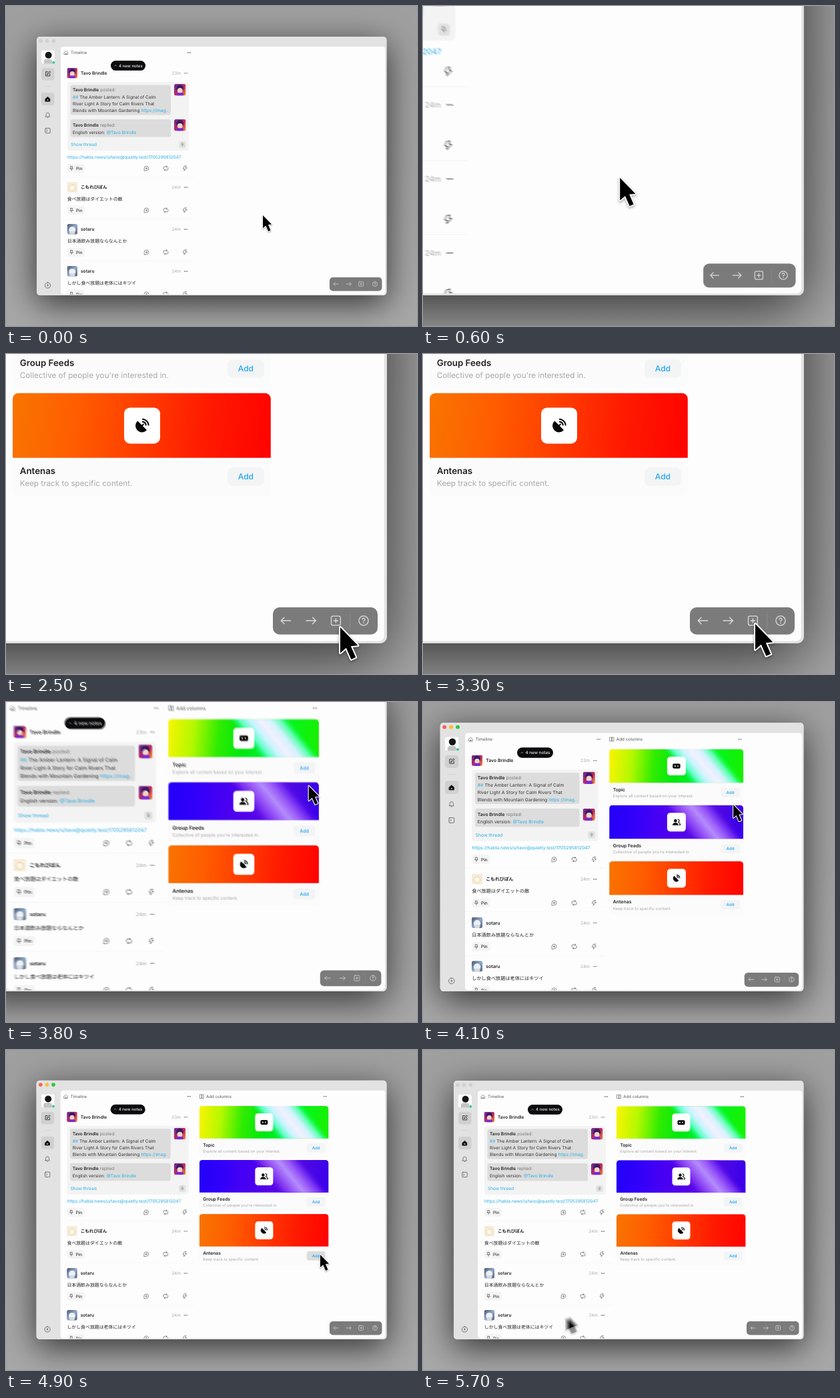
Recreate the animation shown at these times as an HTML page with a canvas. Size 616 by 480 pixels, loop 5800 ms.

```html
<!DOCTYPE html>
<html lang="en">
<head>
<meta charset="utf-8">
<title>Adding a column</title>
<style>
html, body { margin: 0; width: 100%; height: 100%; overflow: hidden; background: #9e9e9e; }
canvas { display: block; width: 616px; height: 480px; }
</style>
</head>
<body>
<canvas id="stage" width="616" height="480"></canvas>
<script>
const W = 616, H = 480, LOOP = 5800;
const ANCHOR = { x: 570, y: 434 };      // the zoom keeps this window corner fixed
const COLUMN_AT = 2300, FOCUS_ON = 1700, FOCUS_OFF = 5500;
const SHUTTER = 12, SAMPLES = 5;
const LINK = '#2aaee6', GREY = '#a9a9a9', INK = '#222';

const out = document.getElementById('stage').getContext('2d');
const layer = document.createElement('canvas');
layer.width = W;
layer.height = H;
const c = layer.getContext('2d');

const ICONS = {
  home: 'M4 11 12 4l8 7v9H4zM10 20v-5h4v5',
  edit: 'M12 4H5v15h15v-7M10 14l1-4 8-8 3 3-8 8z',
  bell: 'M6 16v-6a6 6 0 0 1 12 0v6l2 2H4zM10 21h4',
  term: 'M6 4h12a2 2 0 0 1 2 2v12a2 2 0 0 1-2 2H6a2 2 0 0 1-2-2V6a2 2 0 0 1 2-2zM8 9l3 3-3 3',
  round: 'M12 3a9 9 0 1 1 0 18 9 9 0 0 1 0-18zM12 10a2 2 0 1 1 0 4 2 2 0 0 1 0-4z',
  pin: 'M8 3h8v6l3 5H5l3-5zM12 14v7',
  reply: 'M3 21v-9a9 9 0 1 1 9 9zM12 8v8M8 12h8',
  repost: 'M4 14V9a3 3 0 0 1 3-3h10M14 3l3 3-3 3M20 10v5a3 3 0 0 1-3 3H7M10 21l-3-3 3-3',
  zap: 'M16 2 8 4 4 14h6l-2 8 12-12h-6z',
  left: 'M21 12H3M9 6l-6 6 6 6',
  right: 'M3 12h18M15 6l6 6-6 6',
  plus: 'M6 3h12a3 3 0 0 1 3 3v12a3 3 0 0 1-3 3H6a3 3 0 0 1-3-3V6a3 3 0 0 1 3-3zM12 8v8M8 12h8',
  help: 'M12 3a9 9 0 1 1 0 18 9 9 0 0 1 0-18zM9.5 9.5a2.5 2.5 0 1 1 3.7 2.2c-1 .6-1.2 1-1.2 2M12 16.5v.5',
  cols: 'M3 3h8v18H3zM14 3h7v18h-7z',
  up: 'M6 15l6-6 6 6',
  people: 'M9 4a4 4 0 1 1 0 8 4 4 0 0 1 0-8zM1 20c0-8 16-8 16 0z',
  peopleBack: 'M16 4a4 4 0 0 1 0 8M19 14c3 1 4 3 4 6h-3',
  dish: 'M5 6 18 19A9.2 9.2 0 0 1 5 6zM11 13l3-3',
  waves: 'M13 6a6 6 0 0 1 5 5M13 2a10 10 0 0 1 9 9',
  arrow: 'M0 0V19.2L4.4 15.4 8.2 24 11.6 22.5 7.9 14.1 13.2 13.6z'
};
for (const k in ICONS) ICONS[k] = new Path2D(ICONS[k]);

const clamp = v => Math.max(0, Math.min(1, v));
const smooth = u => { u = clamp(u); return u * u * (3 - 2 * u); };
// overdamped spring from 0 to 1, with a slow and a fast decay rate per second
function spring(t, t0, slow = 4.9, fast = 9.9) {
  const s = Math.max(0, t - t0) / 1000;
  return 1 - (fast * Math.exp(-slow * s) - slow * Math.exp(-fast * s)) / (fast - slow);
}
const zoom = t => 1 + spring(t, 200, 6.2, 8) - spring(t, 3300);

// start, end, x, y of each pointer move
const MOVES = [
  [200, 1550, 525.5, 410.5],
  [1700, 2150, 535.5, 422],
  [2500, 2900, 534, 419.5],
  [3330, 3840, 469, 164.5],
  [4250, 4800, 471, 307],
  [5250, 5950, 108, 441]
];
function pointer(t) {
  let x = 385, y = 314;
  for (const [a, b, tx, ty] of MOVES) {
    const k = smooth((t - a) / (b - a));
    x += (tx - x) * k;
    y += (ty - y) * k;
  }
  return { x, y };
}

function box(x, y, w, h, r, fill) {
  c.beginPath();
  c.roundRect(x, y, w, h, r);
  c.fillStyle = fill;
  c.fill();
}
function disc(x, y, r, fill) {
  c.beginPath();
  c.arc(x, y, r, 0, 7);
  c.fillStyle = fill;
  c.fill();
}
function icon(name, x, y, size, color, width = 1.7, fill = false) {
  c.save();
  c.translate(x - size / 2, y - size / 2);
  c.scale(size / 24, size / 24);
  c.lineWidth = width;
  c.lineCap = c.lineJoin = 'round';
  c.strokeStyle = c.fillStyle = color;
  if (fill) c.fill(ICONS[name]);
  c.stroke(ICONS[name]);
  c.restore();
}
function text(s, x, y, size, color, weight = 400, align = 'left') {
  c.font = `${weight} ${size}px Inter, "Noto Sans CJK JP", "Noto Sans CJK", sans-serif`;
  c.textAlign = align;
  c.fillStyle = color;
  c.fillText(s, x, y);
  return x + c.measureText(s).width;
}
function dots(x, y) {
  for (const d of [-2, 0, 2]) disc(x + d, y, 0.65, '#444');
}
function ramp(x0, y0, x1, y1, ...stops) {
  const g = c.createLinearGradient(x0, y0, x1, y1);
  stops.forEach((s, i) => g.addColorStop(i / (stops.length - 1), s));
  return g;
}
function clipped(x, y, w, h, r, draw) {
  c.save();
  c.beginPath();
  c.roundRect(x, y, w, h, r);
  c.clip();
  draw();
  c.restore();
}
const within = (p, x, y, w, h) => p.x >= x && p.x <= x + w && p.y >= y && p.y <= y + h;

function avatar(kind, x, y, s) {
  clipped(x, y, s, s, 3, () => {
    c.translate(x, y);
    c.scale(s / 16, s / 16);
    if (kind === 'vivid') {
      c.fillStyle = ramp(0, 0, 16, 16, '#5a2d9c', '#c02860', '#f08a28');
      c.fillRect(0, 0, 16, 16);
      disc(8, 6, 5, '#3b1a63');
      disc(8, 9, 3.6, '#f6d3c4');
      box(3, 12, 10, 4, 2, '#7a2bd0');
    } else if (kind === 'cream') {
      c.fillStyle = '#f6ecd8';
      c.fillRect(0, 0, 16, 16);
      disc(8, 9, 5, '#fdf8ea');
      c.strokeStyle = '#e2bf88';
      c.lineWidth = 0.8;
      c.beginPath();
      c.arc(8, 9, 4.5, 0, 7);
      c.stroke();
    } else if (kind === 'pale') {
      c.fillStyle = ramp(0, 0, 16, 16, '#4b5566', '#8fa9cc', '#5b6274');
      c.fillRect(0, 0, 16, 16);
      disc(8, 9, 5, '#eef1f6');
      box(4, 11, 8, 5, 2, '#d5dae4');
    } else {
      c.fillStyle = '#fafafa';
      c.fillRect(0, 0, 16, 16);
      box(3, 10.5, 10, 7, 3, '#c4c4c4');
      disc(8.5, 5.8, 4, '#151515');
    }
  });
}

function sidebar() {
  avatar('person', 53, 66.5, 20);
  disc(71.3, 84.8, 2, '#2fd08a');
  box(53, 93, 19.5, 18.5, 4, '#d0d0d0');
  icon('edit', 62.5, 102, 10, '#222', 2);
  c.fillStyle = '#cccccc';
  c.fillRect(57, 120.2, 11, 0.6);
  box(53, 130, 19.5, 19, 4, '#d0d0d0');
  icon('home', 62.5, 139.7, 10, '#0c0c0c', 2, true);
  disc(62.5, 141, 0.9, '#ddd');
  icon('bell', 62.5, 163.5, 10, '#555');
  icon('term', 62.5, 187, 11, '#555');
  icon('round', 62.5, 419, 11, '#555');
}

function actions(y) {
  box(92, y - 6.5, 26, 13, 3.5, '#f4f4f4');
  icon('pin', 98.2, y, 7.6, '#333', 2);
  text('Pin', 105, y + 2.3, 6.3, '#333', 500);
  icon('reply', 210.5, y, 9, '#555');
  icon('repost', 239.5, y, 10, '#555');
  icon('zap', 268.3, y, 9, '#555');
}
function postHead(kind, name, age, y) {
  avatar(kind, 91.5, y - 8, 15.7);
  text(name, 112, y + 2.4, 6.6, INK, 600);
  text(age, 262, y + 2.3, 6.4, GREY, 400, 'right');
  dots(269.5, y);
}
function post(kind, name, body, y) {
  c.fillStyle = '#f5f5f5';
  c.fillRect(82, y - 16, 202, 0.6);
  postHead(kind, name, '24m', y);
  text(body, 91.8, y + 20, 6.9, INK);
  actions(y + 34.3);
}

function timeline() {
  icon('home', 90, 70, 8, '#555', 1.8);
  text('Timeline', 97, 72.4, 6.1, '#555');
  dots(274.5, 70);

  postHead('vivid', 'Tavo Brindle', '23m', 100.8);
  box(92, 114, 182, 103, 4, '#f3f3f3');
  box(96.5, 118.5, 150.5, 45, 3, '#dcdcdc');
  box(96.5, 170, 150.5, 26.5, 3, '#dcdcdc');
  avatar('vivid', 252, 117, 17.5);
  avatar('vivid', 252, 170, 17.5);
  let x = text('Tavo Brindle', 100, 128, 6.55, INK, 600);
  text('posted:', x + 2, 128, 6.55, '#777');
  x = text('##', 100, 138.8, 6.55, LINK);
  text('The Amber Lantern: A Signal of Calm', x + 2, 138.8, 6.55, '#333');
  text('River Light A Story for Calm Rivers That', 100, 149.2, 6.55, '#333');
  x = text('Blends with Mountain Gardening', 100, 159.4, 6.55, '#333');
  clipped(100, 150, 143, 13, 0, () => text('https://imag...', x + 2, 159.4, 6.55, LINK));
  x = text('Tavo Brindle', 100, 180.5, 6.55, INK, 600);
  text('replied:', x + 2, 180.5, 6.55, '#777');
  x = text('English version:', 100, 191.5, 6.55, '#333');
  text('@Tavo Brindle', x + 2, 191.5, 6.55, LINK);
  text('Show thread', 97, 210.3, 6.55, LINK);
  box(259.5, 203, 10, 10, 2.5, '#e1e1e1');
  icon('pin', 264.5, 208, 6, '#777', 2);
  text('https://habla.news/u/tavo@quietly.test/1705295812047', 92, 229, 6.55, LINK);
  actions(243.5);

  post('cream', 'こもれびぽん', '食べ放題はダイエットの敵', 272);
  post('pale', 'sotaru', '日本酒飲み放題ならなんとか', 335);
  post('pale', 'sotaru', 'しかし食べ放題は老体にはキツイ', 398);

  box(157, 82, 52, 14.8, 7.4, '#0b0b0d');
  icon('up', 164, 89.2, 6, '#eee', 2.2);
  text('4 new notes', 169, 91.5, 6.1, '#f4f4f4', 500);
}

const CARDS = [
  {
    title: 'Topic', note: 'Explore all content based on your interest.',
    base: ['#f8f400', '#b4f800', '#30ec00', '#00e810', '#00f030', '#08f418', '#18f000'],
    glow: ['rgba(0,255,120,0)', '#5effc4', '#c8f4ff', '#f4f0ff', '#d4f2ff', '#5cffb0', 'rgba(0,255,60,0)']
  },
  {
    title: 'Group Feeds', note: "Collective of people you're interested in.",
    base: ['#2400f8', '#3000fa', '#4400f4', '#5200ec', '#5a08e6', '#4c08e4', '#3a00ea'],
    glow: ['rgba(90,20,230,0)', '#7a2cf0', '#9a5cf8', '#b48cfc', '#9a5cf8', '#6c24f0', 'rgba(70,0,230,0)']
  },
  {
    title: 'Antenas', note: 'Keep track to specific content.',
    base: ['#f87400', '#ff5c00', '#ff3c00', '#ff1a00', '#ff0400']
  }
];

function banner({ base, glow }, y) {
  c.fillStyle = ramp(290, y + 16, 483, y + 36, ...base);
  c.fillRect(290, y, 194, 49);
  if (!glow) return;
  c.fillStyle = ramp(403, y + 44, 451, y + 5, ...glow);
  c.fillRect(290, y, 194, 49);
}

function cardIcon(i, y) {
  if (i === 0) {
    box(381.5, y - 3.5, 11, 7, 2, '#080808');
    disc(385, y, 1, '#fff');
    disc(389, y, 0.9, '#fff');
  } else if (i === 1) {
    icon('people', 387, y, 12, '#080808', 1, true);
    icon('peopleBack', 387, y, 12, '#080808', 2);
  } else {
    icon('dish', 387, y, 11.5, '#080808', 2, true);
    icon('waves', 387, y, 11.5, '#080808', 2.2);
  }
}

function addColumn(p) {
  icon('cols', 293.7, 70, 7.5, '#555', 1.9);
  text('Add columns', 300.3, 72.4, 6.1, '#555');
  dots(478.3, 70);
  CARDS.forEach((card, i) => {
    const y = 84.2 + 81 * i;
    box(290, y, 193.4, 77, 4.5, '#fbfbfb');
    clipped(290, y, 193.4, 48.7, [4.5, 4.5, 0, 0], () => banner(card, y));
    box(373.5, y + 11, 27, 27, 4.5, '#fff');
    cardIcon(i, y + 24.5);
    text(card.title, 295.4, y + 61, 6.65, INK, 600);
    text(card.note, 295.4, y + 70, 5.85, GREY);
    const hot = within(p, 451, y + 56, 27.5, 13.5);
    box(451, y + 56, 27.5, 13.5, 3.5, hot ? '#dcdcdc' : '#f3f4f5');
    text('Add', 464.7, y + 64.9, 6, '#1fa6ee', 500, 'center');
  });
}

function toolbar(p, hasColumn) {
  box(485, 407, 78.5, 20.4, 5, '#7b7b7b');
  if (!hasColumn && within(p, 524.2, 408.5, 17, 17)) box(524.2, 408.5, 17, 16.7, 3.5, '#3b3b3b');
  icon('left', 494.7, 417, 9.6, '#dcdcdc');
  icon('right', 513.6, 417, 9.6, '#dcdcdc');
  icon('plus', 532.2, 417, 9.2, '#dcdcdc');
  c.fillStyle = '#8a8a8a';
  c.fillRect(542.6, 411, 0.5, 12);
  icon('help', 553, 417, 9.4, '#dcdcdc');
}

function scene(t) {
  const s = zoom(t), p = pointer(t);
  const hasColumn = t >= COLUMN_AT, focused = t >= FOCUS_ON && t < FOCUS_OFF;
  c.setTransform(s, 0, 0, s, ANCHOR.x * (1 - s), ANCHOR.y * (1 - s));
  c.textRendering = 'geometricPrecision';
  c.fillStyle = ramp(0, 0, 0, H, '#9f9f9f', '#a0a0a0', '#a8a8a8');
  c.fillRect(-5, -5, W + 10, H + 10);

  c.save();
  c.shadowColor = 'rgba(0,0,0,.7)';
  c.shadowBlur = 50 * s;
  c.shadowOffsetY = 12 * s;
  box(46, 46, 524.4, 388, 5, '#e2e2e2');
  c.restore();
  box(46, 46, 524.4, 388, 5, '#e2e2e2');
  ['#fb5f57', '#fdbc2e', '#28c840'].forEach((col, i) =>
    disc(52.2 + 9.6 * i, 52.4, 2.8, focused ? col : '#d0d0d0'));
  sidebar();
  box(82, 61, 486.4, 371.4, 4, '#fdfdfd');
  clipped(82, 61, 486.4, 371.4, 4, () => {
    timeline();
    if (hasColumn) addColumn(p);
  });
  toolbar(p, hasColumn);

  c.save();
  c.translate(p.x, p.y);
  c.shadowColor = 'rgba(0,0,0,.35)';
  c.shadowBlur = 2 * s;
  c.shadowOffsetY = s;
  c.lineWidth = 2;
  c.lineJoin = 'round';
  c.strokeStyle = '#fff';
  c.stroke(ICONS.arrow);
  c.shadowColor = 'transparent';
  c.fillStyle = '#000';
  c.fill(ICONS.arrow);
  c.restore();
}

function moving(t) {
  const u = Math.max(0, t - SHUTTER), a = pointer(t), b = pointer(u);
  return Math.hypot(a.x - b.x, a.y - b.y) + Math.abs(zoom(t) - zoom(u)) * 400 > 1;
}

function frame(now) {
  const t = now % LOOP;
  const n = moving(t) ? SAMPLES : 1;
  for (let i = 0; i < n; i++) {
    scene(Math.max(0, t - SHUTTER * i / SAMPLES));
    out.globalAlpha = 1 / (i + 1);
    out.drawImage(layer, 0, 0);
  }
  out.globalAlpha = 1;
}

const start = performance.now();
function tick() {
  frame(performance.now() - start);
  requestAnimationFrame(tick);
}
tick();
</script>
</body>
</html>
```
